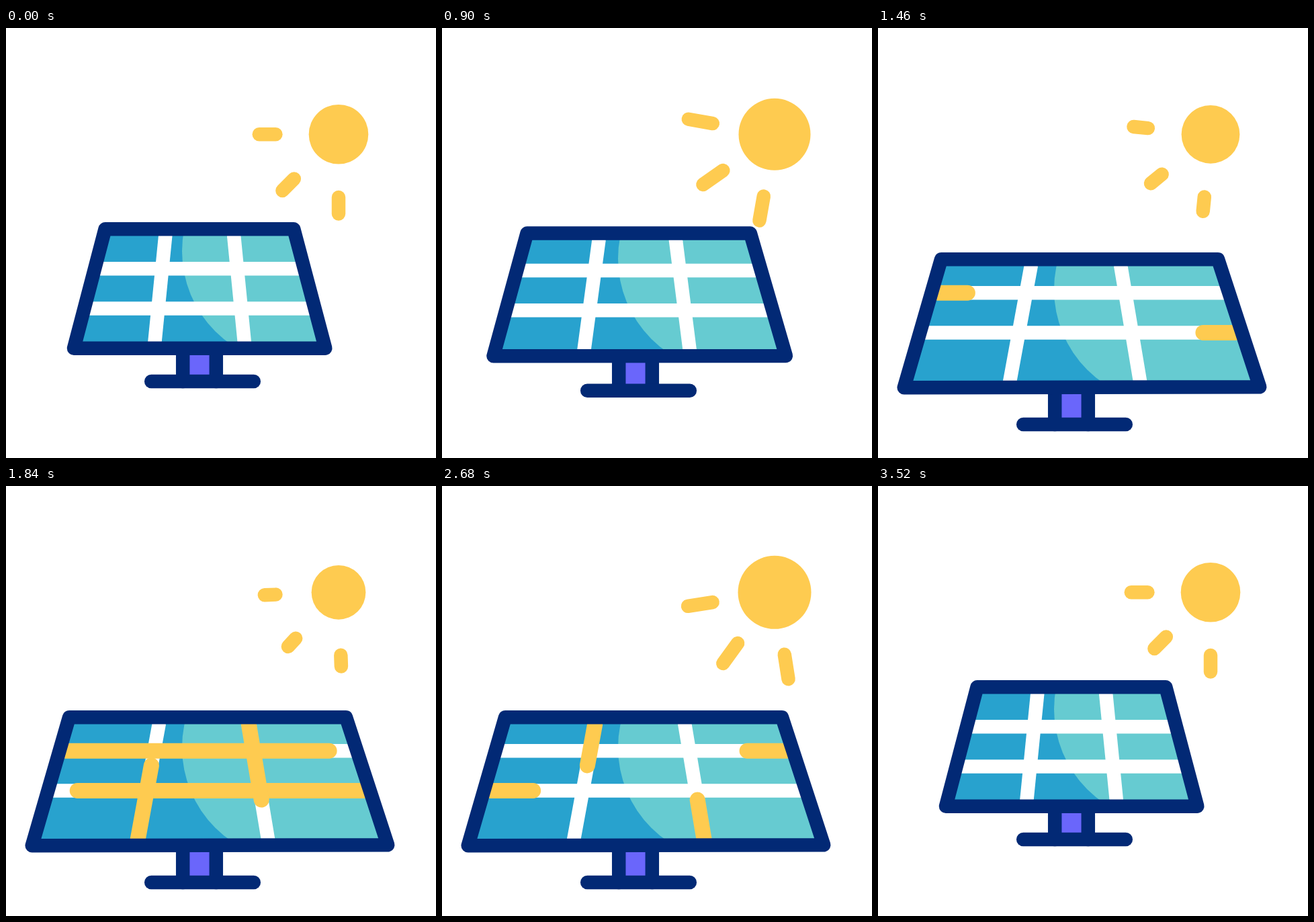
Write an HTML page with a canvas that moves like this. It is 640 px wide and 640 px high and loops after 3.6 s.

```html
<!DOCTYPE html>
<html lang="en">
<head>
<meta charset="utf-8">
<title>Solar panel</title>
<style>
  html, body { margin: 0; width: 100%; height: 100%; overflow: hidden; background: #fff; }
  canvas { display: block; width: 640px; height: 640px; }
</style>
</head>
<body>
<canvas id="stage" width="640" height="640"></canvas>
<script>
const ctx = document.getElementById('stage').getContext('2d');
const LOOP = 3600;
const NAVY = '#022975', BLUE = '#28a2ce', TEAL = '#66cbd1';
const YELLOW = '#fecb50', PURPLE = '#6a66fb', WHITE = '#fff';
const LINE = 20.5;
const SUN = { x: 495, y: 158.3 };

// Keyframes: [time, value], eased in and out between neighbours
const spread = [[480, 0], [1460, 1], [3060, 1], [3440, 0]];
const lift = [[100, 0], [480, -18.8], [1460, 0]];
const sunRadius = [[100, 44.3], [730, 54.5], [1780, 40.2], [2680, 54.5], [3500, 44.3]];
const rayEnd = [[100, 118.2], [780, 131], [1780, 110], [2760, 131], [3500, 118.2]];
const rayTurn = [[170, 0], [1000, 10.4], [2480, -10.3], [3400, 0]];
const rowHead = [[1340, 0], [1940, 1]];
const rowTail = [[2220, 0], [2820, 1]];
const colHead = [[1480, 0], [2080, 1]];
const colTail = [[2320, 0], [2920, 1]];
const GLOW_OFF = 3070;

const mix = (a, b, t) => a + (b - a) * t;
const ease = t => t * t * (3 - 2 * t);

function valueAt(keys, time) {
  if (time <= keys[0][0]) return keys[0][1];
  for (let i = 1; i < keys.length; i++) {
    const [t0, v0] = keys[i - 1], [t1, v1] = keys[i];
    if (time < t1) return mix(v0, v1, ease((time - t0) / (t1 - t0)));
  }
  return keys[keys.length - 1][1];
}

function line(x1, y1, x2, y2, color, width = LINE) {
  ctx.strokeStyle = color;
  ctx.lineWidth = width;
  ctx.beginPath();
  ctx.moveTo(x1, y1);
  ctx.lineTo(x2, y2);
  ctx.stroke();
}

// The part of a line between two fractions of its length
function glow([x1, y1, x2, y2], head, tail) {
  if (head <= 0) return;
  const a = Math.min(tail, 0.999);
  line(mix(x1, x2, a), mix(y1, y2, a), mix(x1, x2, head), mix(y1, y2, head), YELLOW, 23);
}

function drawSun(time) {
  ctx.fillStyle = YELLOW;
  ctx.beginPath();
  ctx.arc(SUN.x, SUN.y, valueAt(sunRadius, time), 0, Math.PI * 2);
  ctx.fill();
  const end = valueAt(rayEnd, time), turn = valueAt(rayTurn, time);
  for (const base of [90, 135, 180]) {
    const angle = (base + turn) * Math.PI / 180;
    const c = Math.cos(angle), s = Math.sin(angle);
    line(SUN.x + 93.6 * c, SUN.y + 93.6 * s, SUN.x + end * c, SUN.y + end * s, YELLOW);
  }
}

function drawPanel(time) {
  const p = valueAt(spread, time), dy = valueAt(lift, time);
  const X = (a, b) => mix(a, b, p);
  const Y = (a, b) => mix(a, b, p) + dy;

  const corners = [
    [X(147.5, 94), Y(299.3, 344.3)],
    [X(428.3, 506), Y(299.3, 344.3)],
    [X(475.3, 568.2), Y(476.7, 534.3)],
    [X(101, 38.7), Y(476.7, 535.3)]
  ];
  const [tl, tr, br, bl] = corners;
  const baseY = Y(526, 590);

  // Stand
  ctx.fillStyle = PURPLE;
  ctx.fillRect(263, br[1], 50, baseY - br[1]);
  line(263.2, br[1], 263.2, baseY, NAVY);
  line(312.8, br[1], 312.8, baseY, NAVY);
  line(216.2, baseY, 368.8, baseY, NAVY);

  const outline = new Path2D();
  corners.forEach(([x, y]) => outline.lineTo(x, y));
  outline.closePath();

  ctx.save();
  ctx.clip(outline);
  ctx.fillStyle = BLUE;
  ctx.fillRect(0, 0, 640, 640);
  ctx.fillStyle = TEAL;
  ctx.beginPath();
  ctx.arc(431, Y(332, 389.3), 169, 0, Math.PI * 2);
  ctx.fill();
  ctx.fillRect(431, 0, 209, 640);

  const row = y => {
    const t = (y - tl[1]) / (bl[1] - tl[1]);
    return [mix(tl[0], bl[0], t) + 9.8, y, mix(tr[0], br[0], t) - 9.8, y];
  };
  const top = Y(309.5, 355), bottom = Y(469.5, 528);
  const row1 = row(Y(358.2, 394.2));
  const [left, y2, right] = row(Y(417.5, 453.4));
  const row2 = [right, y2, left, y2];
  const col1 = [X(221.2, 195.8), bottom, X(237.2, 227.6), top];
  const col2 = [X(339.2, 361.4), top, X(355, 390.4), bottom];

  line(row1[0] - 4, row1[1], row1[2] + 4, row1[3], WHITE);
  line(left - 4, y2, right + 4, y2, WHITE);
  line(...col1, WHITE);
  line(...col2, WHITE);

  if (time < GLOW_OFF) {
    for (const r of [row1, row2]) glow(r, valueAt(rowHead, time), valueAt(rowTail, time));
    for (const c of [col1, col2]) glow(c, valueAt(colHead, time), valueAt(colTail, time));
  }
  ctx.restore();

  ctx.strokeStyle = NAVY;
  ctx.lineWidth = LINE;
  ctx.stroke(outline);
}

function draw(now) {
  const time = now % LOOP;
  ctx.fillStyle = WHITE;
  ctx.fillRect(0, 0, 640, 640);
  ctx.lineCap = ctx.lineJoin = 'round';
  drawSun(time);
  drawPanel(time);
}

let start = null;
function tick(now) {
  if (start === null) start = now;
  draw(now - start);
  requestAnimationFrame(tick);
}
draw(0);
requestAnimationFrame(tick);
</script>
</body>
</html>
```
